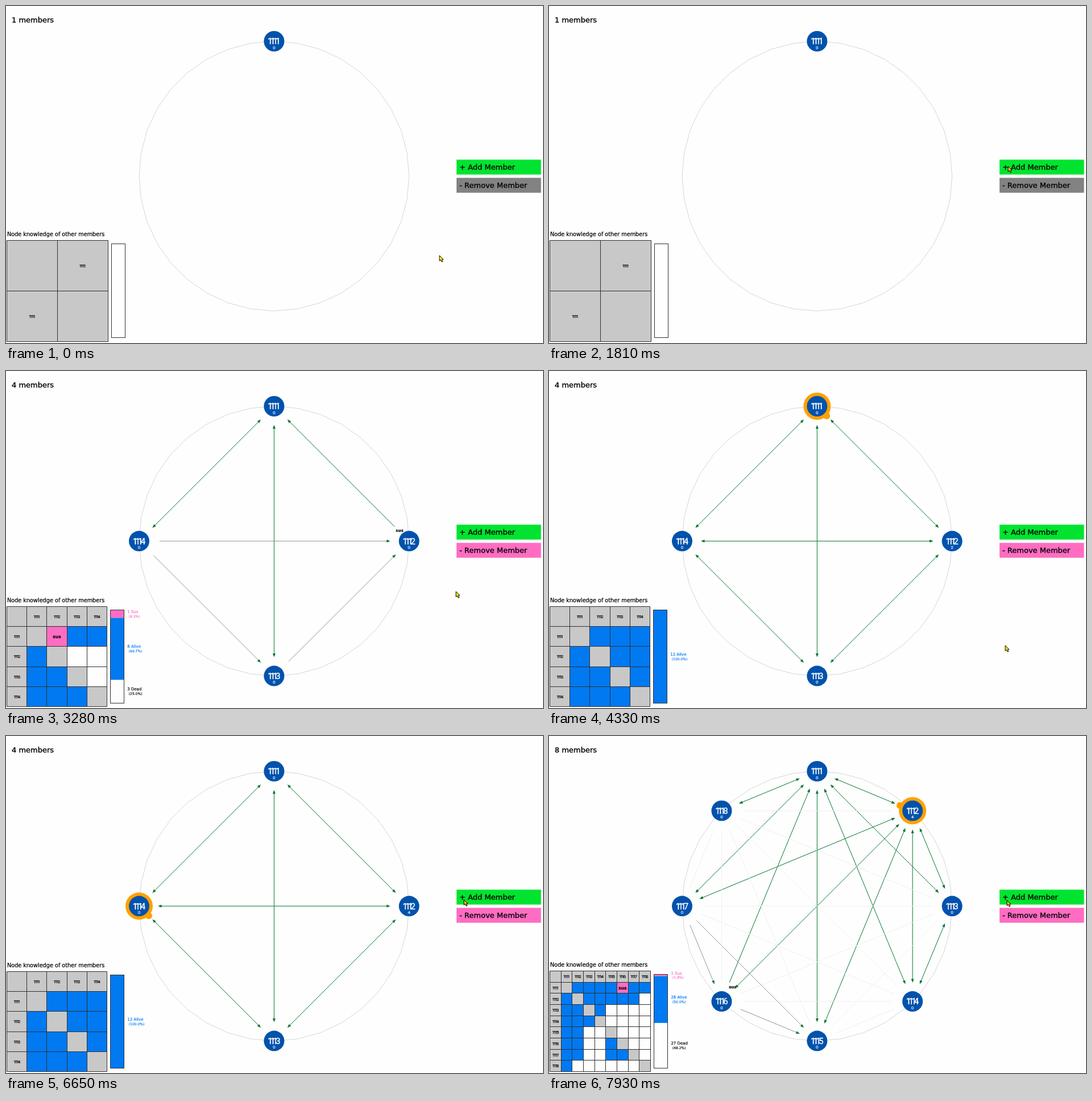
An HTML page with a canvas that plays this animation: 944 px wide and 593 px high, repeating every 7990 ms.

```html
<!DOCTYPE html>
<html lang="en">
<head>
<meta charset="utf-8">
<title>Membership ring</title>
<style>
  html, body { margin: 0; width: 100%; height: 100%; overflow: hidden; background: #fefefe; }
  canvas { display: block; width: 944px; height: 593px; }
</style>
</head>
<body>
<canvas id="stage" width="944" height="593"></canvas>
<script>
const ctx = document.getElementById('stage').getContext('2d');
const LOOP = 7990;
const CENTER = { x: 471.3, y: 299.3 };
const RADIUS = 237.3;
const SANS = '"DejaVu Sans", sans-serif';
const NARROW = 'Roboto, sans-serif';
const C = {
  blue: '#0079f1', navy: '#0052ac', green: '#00e430', forest: '#00752c',
  pink: '#ff6dc2', gray: '#828282', light: '#c8c8c8', faint: '#f0f0f0',
  orange: '#ffa100', yellow: '#fdf900', black: '#000', white: '#fefefe',
  grid: '#303030', circle: '#d6d6d6'
};

// Start time, the members each member knows, and an optional suspicion (by, of).
const phases = [
  [0, ['']],
  [1970, ['2', '1']],
  [2390, ['23', '1', '1']],
  [2450, ['23', '1', '12']],
  [2670, ['234', '1', '12', '1']],
  [3040, ['234', '1', '12', '123'], '12'],
  [3400, ['234', '134', '124', '123']],
  [6710, ['2345', '134', '124', '123', '1']],
  [6770, ['2345', '134', '124', '123', '12']],
  [6940, ['23456', '134', '124', '123', '12', '1']],
  [7060, ['23456', '134', '124', '123', '12', '125']],
  [7400, ['234567', '134', '124', '123', '12', '125', '1']],
  [7460, ['234567', '134', '124', '123', '12', '125', '1256']],
  [7630, ['2345678', '134', '124', '123', '12', '125', '1256', '1']],
  [7810, ['2345678', '134567', '124', '123', '12', '125', '1256', '1'], '16']
];

// Ring on, ring off, member, member it points at.
const pings = [
  [3340, 3600, 1, 2], [3890, 4140, 2, 4], [4330, 4580, 1, 2],
  [4580, 5560, 3, 1], [4770, 5020, 4, 2], [4890, 5130, 2, 4],
  [5310, 5560, 1, 3], [5730, 5970, 4, 3], [5850, 6090, 2, 4],
  [6210, 6460, 1, 3], [6210, 6460, 3, 1], [6650, 6940, 4, 3],
  [7220, 7460, 1, 6], [7220, 7460, 3, 4], [7930, 7990, 2, 1]
];

const countTimes = [3600, 4330, 5130, 5620];

const pointer = [
  [0, 761, 438], [610, 761, 438], [1060, 746, 370], [1460, 762, 300],
  [1810, 806, 281], [2980, 806, 281], [3280, 790, 387], [3600, 801, 482],
  [5310, 801, 482], [5700, 797, 400], [6090, 800, 304], [6210, 804, 287],
  [7630, 804, 287], [7930, 804, 288], [LOOP, 804, 288]
];

function text(str, x, cy, size, color = C.black, align = 'left', font = SANS, spacing = 0, weight = '') {
  const y = cy + size * 0.36;
  ctx.font = `${weight} ${size}px ${font}`;
  ctx.letterSpacing = `${spacing}px`;
  ctx.textAlign = align;
  ctx.fillStyle = ctx.strokeStyle = color;
  ctx.lineWidth = size * 0.025;
  ctx.fillText(str, x, y);
  ctx.strokeText(str, x, y);
}

function memberName(i, x, cy, size, color) {
  text(`111${i}`, x - size * 0.13, cy, size, color, 'center', NARROW, -size * 0.25);
}

function rect(x, y, w, h, color) {
  ctx.fillStyle = color;
  ctx.fillRect(x, y, w, h);
}

function disc(x, y, r, color) {
  ctx.fillStyle = color;
  ctx.beginPath();
  ctx.arc(x, y, r, 0, Math.PI * 2);
  ctx.fill();
}

function line(x1, y1, x2, y2, color) {
  ctx.strokeStyle = color;
  ctx.lineWidth = 1;
  ctx.beginPath();
  ctx.moveTo(x1, y1);
  ctx.lineTo(x2, y2);
  ctx.stroke();
}

function polygon(points) {
  ctx.beginPath();
  points.forEach(([x, y]) => ctx.lineTo(x, y));
  ctx.closePath();
}

const snap = v => Math.floor(v) + 0.5;

function place(i, n) {
  const a = (i / n) * Math.PI * 2;
  return { x: CENTER.x + RADIUS * Math.sin(a), y: CENTER.y - RADIUS * Math.cos(a) };
}

function toward(from, to) {
  const dx = to.x - from.x, dy = to.y - from.y, d = Math.hypot(dx, dy);
  return { x: dx / d, y: dy / d };
}

function relation(phase, i, j) {
  const [, rows, suspicion] = phase;
  if (suspicion === `${i}${j}`) return 'sus';
  return rows[i - 1].includes(j) ? 'alive' : 'dead';
}

function drawCircle() {
  ctx.strokeStyle = C.circle;
  ctx.lineWidth = 1;
  polygon(Array.from({ length: 36 }, (_, i) => {
    const p = place(i, 36);
    return [p.x, p.y];
  }));
  ctx.stroke();
}

function drawHead(node, u) {
  const at = (d, side) => [node.x + u.x * d - u.y * side, node.y + u.y * d + u.x * side];
  ctx.fillStyle = C.forest;
  polygon([at(33, 0), at(39.5, 2.5), at(39.5, -2.5)]);
  ctx.fill();
}

function drawLink(phase, nodes, i, j) {
  const a = nodes[i - 1], b = nodes[j - 1], u = toward(a, b), back = { x: -u.x, y: -u.y };
  const there = relation(phase, i, j), here = relation(phase, j, i);
  const known = (there !== 'dead') + (here !== 'dead');
  line(a.x + u.x * 36, a.y + u.y * 36, b.x - u.x * 36, b.y - u.y * 36,
    [C.faint, '#929292', C.forest][known]);
  if (here === 'alive') drawHead(a, u);
  if (there === 'alive') drawHead(b, back);
  if (there === 'sus') {
    text('sus', b.x - u.x * 33, b.y - u.y * 33 + 6 - Math.abs(u.y) * 1.5, 7, C.black, 'left', SANS, 0, 'bold');
  }
}

function drawNodes(t, nodes) {
  for (const [on, off, i, target] of pings) {
    if (t < on || t >= off) continue;
    const p = nodes[i - 1], u = toward(p, nodes[target - 1]);
    disc(p.x, p.y, 24, C.orange);
    disc(p.x + u.x * 24, p.y + u.y * 24, 6, C.orange);
  }
  nodes.forEach((p, k) => {
    disc(p.x, p.y, 18, C.navy);
    memberName(k + 1, p.x, p.y, 15, C.white);
    const count = k === 1 ? countTimes.filter(s => t >= s).length : 0;
    text(count, p.x, p.y + 11, 8, C.white, 'center', NARROW);
  });
}

function drawTable(phase, n) {
  const cell = Math.floor(299 / (n + 1)) * 0.595;
  const size = cell * (n + 1), left = 1.7, bottom = 590.3, top = bottom - size;
  const fills = { alive: C.blue, sus: C.pink, dead: C.white };
  const totals = { sus: 0, alive: 0, dead: 0 };

  text('Node knowledge of other members', 2, top - 11.5, 9.7);
  rect(left, top, size, size, C.light);
  for (let r = 1; r <= n; r++) {
    for (let c = 1; c <= n; c++) {
      if (r === c) continue;
      const state = relation(phase, r, c), x = left + c * cell, y = top + r * cell;
      totals[state]++;
      rect(x, y, cell, cell, fills[state]);
      if (state === 'sus') text('sus', x + cell / 2, y + cell / 2, 7.5, C.black, 'center', SANS, 0, 'bold');
    }
  }
  for (let k = 0; k <= n + 1; k++) {
    const x = snap(left + k * cell), y = snap(top + k * cell);
    line(x, snap(top), x, snap(bottom), C.grid);
    line(snap(left), y, snap(left + size), y, C.grid);
  }
  for (let k = 1; k <= n; k++) {
    const mid = (k + 0.5) * cell;
    memberName(k, left + mid, top + cell / 2, 8, C.black);
    memberName(k, left + cell / 2, top + mid, 8, C.black);
  }
  drawBar(left + size + 6, top + 6, bottom - 6, totals);
}

function drawBar(x, top, bottom, totals) {
  const sum = totals.sus + totals.alive + totals.dead;
  const kinds = [['sus', 'Sus', C.pink], ['alive', 'Alive', C.blue], ['dead', 'Dead', C.black]];
  let y = top;
  rect(x, top, 24, bottom - top, C.white);
  for (const [key, label, color] of kinds) {
    if (!totals[key]) continue;
    const share = totals[key] / sum, h = share * (bottom - top);
    if (key !== 'dead') rect(x, y, 24, h, color);
    text(`${totals[key]} ${label}`, x + 30, y + h / 2 - 4, 7, color);
    text(`(${(share * 100).toFixed(1)}%)`, x + 32.5, y + h / 2 + 4, 6, color);
    y += h;
  }
  ctx.strokeStyle = C.grid;
  ctx.lineWidth = 1;
  ctx.strokeRect(snap(x), snap(top), 24, Math.round(bottom - top));
}

function drawButtons(n) {
  rect(792, 270.4, 148.5, 26.2, C.green);
  rect(792, 302.4, 148.5, 26.2, n > 1 ? C.pink : C.gray);
  text('+ Add Member', 797, 283, 13);
  text('- Remove Member', 797, 315, 13);
}

function drawPointer(t) {
  const k = pointer.findIndex(p => p[0] > t);
  const [t0, x0, y0] = pointer[k - 1], [t1, x1, y1] = pointer[k];
  const f = (t - t0) / (t1 - t0);
  const x = x0 + (x1 - x0) * f, y = y0 + (y1 - y0) * f;
  const hover = x >= 792 && y >= 270 && y < 297;
  ctx.save();
  ctx.translate(x + 1, y + 1);
  polygon([[0, 0], [0, 9.5], [2.3, 7.6], [4, 11.3], [5.8, 10.5], [4.2, 7], [6.8, 7]]);
  ctx.fillStyle = hover ? '#ffc020' : C.yellow;
  ctx.strokeStyle = C.black;
  ctx.lineWidth = 1;
  ctx.fill();
  ctx.stroke();
  ctx.restore();
}

function draw(t) {
  const phase = phases.filter(p => p[0] <= t).pop();
  const n = phase[1].length;
  const nodes = phase[1].map((_, i) => place(i, n));

  rect(0, 0, 944, 593, C.white);
  text(`${n} members`, 10, 24.5, 13);
  drawCircle();
  for (let i = 1; i <= n; i++) {
    for (let j = i + 1; j <= n; j++) drawLink(phase, nodes, i, j);
  }
  drawNodes(t, nodes);
  drawTable(phase, n);
  drawButtons(n);
  drawPointer(t);
}

let start;
function tick(now) {
  start ??= now;
  draw((now - start) % LOOP);
  requestAnimationFrame(tick);
}
draw(0);
requestAnimationFrame(tick);
</script>
</body>
</html>
```
